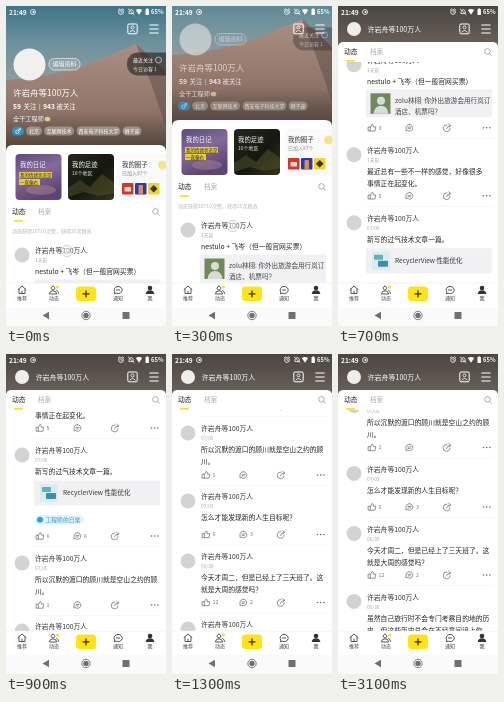
An HTML page that plays this animation: 160 by 320 pixels, repeating every 3.9 s.

```html
<!DOCTYPE html>
<html>
<head>
<meta charset="utf-8">
<style>
html, body { margin: 0; width: 100%; height: 100%; overflow: hidden; background: #fff; }
svg { display: block; width: 100vw; height: 100vh; }
text { font-family: "Noto Sans CJK SC", "Noto Sans CJK", "Noto Sans", sans-serif; white-space: pre; }
</style>
</head>
<body>
<svg id="stage" viewBox="0 0 160 320">
  <defs>
    <linearGradient id="sky" x1="0" y1="0" x2="0" y2="1">
      <stop offset="0" stop-color="#3f7488"/><stop offset=".25" stop-color="#6c919d"/>
      <stop offset=".5" stop-color="#8d9ca1"/><stop offset=".7" stop-color="#a39a98"/>
    </linearGradient>
    <linearGradient id="dune" x1="0" y1="0" x2="0" y2="1">
      <stop offset="0" stop-color="#ab8f84"/><stop offset=".55" stop-color="#92776c"/>
      <stop offset="1" stop-color="#6b574d"/>
    </linearGradient>
    <linearGradient id="ground" x1="0" y1="0" x2="0" y2="1">
      <stop offset="0" stop-color="#55473d" stop-opacity="0"/>
      <stop offset="1" stop-color="#4b4036"/>
    </linearGradient>
    <linearGradient id="dim" gradientUnits="userSpaceOnUse" x1="0" y1="0" x2="0" y2="140">
      <stop offset="0" stop-color="#4b4541"/><stop offset=".28" stop-color="#6a6058"/>
      <stop offset="1" stop-color="#6a6663"/>
    </linearGradient>
    <linearGradient id="dusk" x1="0" y1="0" x2=".4" y2="1">
      <stop offset="0" stop-color="#5b4a80"/><stop offset=".5" stop-color="#846a98"/>
      <stop offset="1" stop-color="#5d4478"/>
    </linearGradient>
    <linearGradient id="wood" x1="0" y1="0" x2="1" y2="1">
      <stop offset="0" stop-color="#23271d"/><stop offset=".55" stop-color="#15180f"/>
      <stop offset="1" stop-color="#34331b"/>
    </linearGradient>
  </defs>
  <rect width="160" height="320" fill="#fff"/>
  <g id="photo"></g>
  <rect id="shade" width="160" height="150" fill="url(#dim)"/>
  <g id="profile"><g id="badge"></g><g id="name"></g><g id="facts"></g></g>
  <g id="sheet"></g>
  <g id="cover">
    <path d="M0 0H160V42Q160 36 154 36H6Q0 36 0 42Z" fill="url(#dim)"/>
    <g id="title"></g>
  </g>
  <g id="tabs"></g>
  <g id="touch" fill="#fff" fill-opacity=".35" stroke="#aaa" stroke-width=".6">
    <circle r="5.5"/><circle r="3"/>
  </g>
  <g id="bars"></g>
</svg>
<script>
const $ = id => document.getElementById(id);
const clamp = v => Math.max(0, Math.min(1, v));
const USER = '许岩舟等100万人';

// y is the middle of the line
const txt = (x, y, size, fill, str, more = '') =>
  `<text x="${x}" y="${y + size * .36}" font-size="${size}" fill="${fill}" ${more}>${str}</text>`;
const box = (x, y, w, h, r, fill, more = '') =>
  `<rect x="${x}" y="${y}" width="${w}" height="${h}" rx="${r}" fill="${fill}" ${more}/>`;
const dot = (x, y, r, fill, more = '') =>
  `<circle cx="${x}" cy="${y}" r="${r}" fill="${fill}" ${more}/>`;
const ring = (x, y, r, color, w = .8) => dot(x, y, r, 'none', `stroke="${color}" stroke-width="${w}"`);
const line = (d, color, w = .8, more = '') =>
  `<path d="${d}" fill="none" stroke="${color}" stroke-width="${w}" stroke-linecap="round" stroke-linejoin="round" ${more}/>`;
const at = (x, y, body) => `<g transform="translate(${x} ${y})">${body}</g>`;
const BOLD = 'font-weight="700"', MEDIUM = 'font-weight="500"', MID = 'text-anchor="middle"';

$('photo').innerHTML =
  box(0, 0, 160, 146, 0, 'url(#sky)') +
  '<path d="M0 74Q40 72 76 60Q108 48 130 38Q144 50 160 66V150H0Z" fill="url(#dune)"/>' +
  '<path d="M130 38Q144 50 160 66V122Q146 78 130 38Z" fill="#5d4d46" opacity=".5"/>' +
  box(0, 108, 160, 42, 0, 'url(#ground)');

const pill = (x, w, str) =>
  box(x, 120.5, w, 9, 4.5, '#fff', 'fill-opacity=".32"') +
  txt(x + w / 2, 125, 5, '#fff', str, MID);

$('badge').innerHTML =
  dot(23.5, 58.5, 16, '#f1f0ee') +
  box(43, 52.5, 31, 11.5, 5.5, '#fff', 'fill-opacity=".12" stroke="#fff" stroke-width=".6"') +
  txt(58.5, 58, 6, '#fff', '编辑资料', MID) +
  box(121, 46.5, 52, 23, 11, '#2a2626', 'fill-opacity=".65"') +
  txt(127, 54, 5, '#fff', '最近关注') + ring(152.5, 54, 3, '#ddd', .7) +
  txt(127, 63, 5, '#ddd', '今日访客 1');

$('name').innerHTML = txt(7, 86.5, 8.5, '#fff', USER, MEDIUM);

$('facts').innerHTML =
  txt(7, 101, 6.8, '#fff', '59', BOLD) + txt(17.5, 101, 6.4, '#fff', '关注') +
  line('M33.7 98.5V104', '#fff', .5) +
  txt(37, 101, 6.8, '#fff', '943', BOLD) + txt(50.5, 101, 6.4, '#fff', '被关注') +
  txt(7, 113, 6.2, '#fff', '全干工程师') +
  '<ellipse cx="41.5" cy="113" rx="2.8" ry="2.3" fill="#d6cf91"/>' +
  box(6, 120.5, 12, 9, 4.5, '#2d93c4') +
  ring(11.4, 125.7, 1.7, '#fff', .7) +
  line('M12.6 124.5L14.3 122.8M12.9 122.8H14.3V124.2', '#fff', .7) +
  pill(20, 16, '北京') + pill(38, 30, '互联网技术') +
  pill(70.5, 44, '西安电子科技大学') + pill(116.5, 19, '狮子座');

const cards =
  box(9.5, 148, 46, 46, 4, 'url(#dusk)') +
  '<ellipse cx="35" cy="184" rx="15" ry="5" fill="#b08a8c" opacity=".45"/>' +
  txt(14, 158.5, 6.4, '#fff', '我的日记', MEDIUM) +
  box(13, 166, 33, 6, .5, '#e8cf36') + txt(14, 169, 4.5, '#322b22', '我的情绪状态是:') +
  box(13, 173, 21, 6, .5, '#e8cf36') + txt(14, 176, 4.5, '#322b22', '一直偏右') +
  box(62, 148, 46, 46, 4, 'url(#wood)') +
  '<path d="M62 182L74 174L84 181L96 168L108 177V187L92 190L78 186L62 191Z" fill="#55522c" opacity=".5"/>' +
  txt(66, 158.5, 6.4, '#fff', '我的足迹', MEDIUM) + txt(66, 167.5, 5, '#e2e5e2', '16个地区') +
  box(113, 148, 60, 46, 4, '#fafafa') +
  txt(116, 158.5, 6.4, '#333', '我的圈子', MEDIUM) + txt(116, 167.5, 5, '#888', '已加入87个') +
  dot(156.5, 159, 4.5, '#f3e58a') +
  box(116, 177, 11.5, 11.5, 1, '#d8352a') + box(118.5, 181, 6.5, 4.5, .5, '#f1dcd4') +
  box(129, 177, 11.5, 11.5, 1, '#2a3bb0') + box(132.5, 179, 4.5, 9.5, 1, '#d98d5a') +
  box(142, 177, 11.5, 11.5, 1, '#f0d62c') +
  '<path d="M147.7 179L151.5 182.8L147.7 186.6L143.9 182.8Z" fill="#3a3420"/>';

const actions = (y, likes, replies) => at(0, y,
  line('M30.5 -.8H32.3V3.2H30.5ZM32.3 -.6L34.2 -3.6Q35.7 -3.5 35.2 -.9H37.8L37 3.2H32.3', '#666', .7) +
  txt(40.5, 0, 5.4, '#777', likes) +
  line('M71.5 -3.3A3.3 3.3 0 1 1 69.5 2.6L68 3V.4A3.3 3.3 0 0 1 71.5 -3.3M70 -.6H73M70 .9H72.4', '#666', .7) +
  txt(78, 0, 5.4, '#777', replies) +
  line('M109 -3A3.4 3.4 0 1 0 112 .7M108.4 1Q108.8 -1.7 112.4 -2.3M110.6 -3.9L112.5 -2.3L111.2 -.5', '#666', .7) +
  [145.5, 148.7, 151.9].map(x => dot(x, 0, .8, '#666')).join('') +
  line('M29 10.5H155', '#ededed', .5));

const post = (y, date, lines, like, likes, replies, extra = '') => at(0, y,
  dot(16, 4, 7.5, '#d4d3d1') +
  txt(29, 0, 6.8, '#333', USER) + txt(29, 9.3, 4.8, '#aaa', date) +
  lines.map((s, i) => txt(29, 21 + i * 11.6, 6.8, '#222', s)).join('') +
  extra + actions(like, likes, replies));

const quote =
  box(28, 28.5, 126, 28, 1, '#f1f1f3') +
  box(32.5, 32.5, 20, 20.5, 0, '#70885c') + dot(43, 40, 4, '#d9dcd4') +
  '<path d="M35.5 53Q36.5 45 43 45T50.5 53Z" fill="#d9dcd4"/>' +
  txt(57, 39.5, 6.6, '#444', 'zolu林栩: 你外出旅游会用行岚订') +
  txt(57, 51, 6.6, '#444', '酒店、机票吗？');

const article =
  box(28, 29.5, 126, 25, 1, '#f1f1f3') +
  box(34, 33, 18, 18, 1, '#dcebed') + box(36, 36, 9, 5, 1, '#57b5c4') +
  box(40, 42, 10, 6, 1, '#3b8fa8') +
  txt(57, 42, 6.5, '#333', 'RecyclerView 性能优化') +
  box(29, 64, 49, 9.5, 4.7, '#e3f3fb') + dot(34, 68.8, 3, '#2ba4dc') +
  txt(39.5, 68.8, 5.8, '#2b96cc', '工程师的日常');

$('sheet').innerHTML =
  '<path d="M0 146Q0 139 7 139H153Q160 139 160 146V900H0Z" fill="#fff"/>' + cards +
  txt(6, 225, 5, '#b5b5b5', '动态获得10710次赞，获得25次精选') +
  post(245, '1天前', ['nestulo + 飞岑（但一般官网买票）'], 67, '3', '', quote) +
  post(335, '1天前', ['最近总有一些不一样的感觉，好像很多', '事情正在起变化。'], 45, '5', '') +
  post(403, '07/06', ['新写的过气技术文章一篇。'], 85, '6', '6', article) +
  post(511, '07/05', ['所以沉默的渡口的顾川就是空山之约的顾', '川。'], 46, '1', '') +
  post(579, '07/03', ['怎么才能发现新的人生目标呢？'], 37.5, '6', '3') +
  post(639, '06/30', ['今天才周二，但是已经上了三天班了。这', '就是大周的感觉吗？'], 45.5, '12', '2') +
  post(707, '06/30', ['虽然自己旅行时不会专门考察目的地的历', '史。但这些历史总会在不经意间追上你。'], 46, '8', '');

$('title').innerHTML = dot(16, 23, 7, '#efeeec') + txt(29.5, 23, 7, '#fff', USER);

$('tabs').innerHTML =
  '<path d="M0 -4Q0 -10 6 -10H154Q160 -10 160 -4V10H0Z" fill="#fff"/>' +
  box(8, 8, 9, 1.8, .9, '#ffe01b') +
  txt(6, 0, 6.8, '#222', '动态', MEDIUM) + txt(32, 0, 6.5, '#aaa', '档案') +
  ring(149.5, -.6, 2.8, '#999') + line('M151.6 1.5L153.4 3.3', '#999');

const item = (x, label, d) =>
  line(d, '#444', .9, `transform="translate(${x} 284)"`) + txt(x, 292.5, 5, '#444', label, MID);

$('bars').innerHTML =
  txt(3, 6.5, 6.6, '#fff', '21:49', BOLD) + ring(27, 6, 2.5, '#fff') + dot(27.5, 6, 1, '#fff') +
  ring(115, 6, 2.4, '#fff') +
  line('M115 4.7V6.2H116.2M112.3 3.8L113.5 2.7M116.5 2.7L117.7 3.8', '#fff', .7) +
  line('M123.3 7.6H127.2V5.2Q125.2 1.6 123.3 5.2ZM122.3 3L128 8.6', '#fff', .8) +
  '<path d="M129.8 4Q133 1.8 136.2 4L133 8.8Z" fill="#fff"/>' +
  box(139.5, 3, 3.4, 6, .6, '#fff') + box(140.5, 2.3, 1.4, 1, 0, '#fff') +
  txt(145, 6.2, 5.9, '#fff', '65%', BOLD) +
  box(121.8, 18, 9.4, 9.8, 1.2, 'none', 'stroke="#fff" stroke-width="1"') +
  ring(126.5, 21.4, 1.5, '#fff') +
  line('M123.9 26Q126.5 22.7 129.1 26', '#fff') +
  line('M143.8 19H152.2M143.8 23H152.2M143.8 27H152.2', '#fff', 1.2) +
  box(0, 277, 160, 43, 0, '#fff') + line('M0 277H160', '#e4e4e4', .5) +
  item(16, '推荐', 'M-4 -.4L0 -4L4 -.4M-3 -1V3.5H3V-1M0 1V3.4') +
  item(48, '动态', 'M-1 -3.8A1.9 1.9 0 1 1 -1.1 -3.8M-4.6 3.6Q-4.3 .8 -1 .8T2.6 3.6ZM2.6 .4Q4.4 1 4.6 3.4') +
  dot(51.5, 281, 1.5, '#ffe01b') +
  box(70, 280.5, 20, 14.5, 3.5, '#ffe411') + line('M77 287.8H83M80 284.8V290.8', '#222', 1.2) +
  item(112, '通知', 'M0 -3.6A4 3.6 0 1 1 -1.6 3.2L-3.6 3.8L-3.2 2A4 3.6 0 0 1 0 -3.6M-1.6 0H1.6') +
  dot(144, 282, 2.3, '#333') + '<path d="M139.7 288Q140 284.2 144 284.2T148.3 288Z" fill="#333"/>' +
  txt(144, 292.5, 5, '#222', '我', MID) +
  box(0, 301, 160, 19, 0, '#fafafa') +
  '<path d="M36.5 309.5L43 305.8V313.2Z" fill="#707070"/>' +
  ring(80, 309.5, 4.2, '#707070', .9) + dot(80, 309.5, 2.7, '#707070') +
  box(116.5, 306, 7, 7, .5, '#707070');

// Slow drag, then a fling that dies away: [ms, px, px per ms]
const KEYS = [[0, 0, 0], [300, 25, .146], [500, 73, .468], [900, 306, .454], [1300, 436, .196], [1700, 463.5, 0]];

function scrollAt(t) {
  const i = KEYS.findIndex(k => k[0] > t);
  if (i < 0) return KEYS[KEYS.length - 1][1];
  const [t0, a, va] = KEYS[i - 1], [t1, b, vb] = KEYS[i];
  const d = t1 - t0, u = (t - t0) / d, v = 1 - u;
  return v * v * (1 + 2 * u) * a + u * u * (3 - 2 * u) * b + d * u * v * (v * va - u * vb);
}

const move = (id, x, y) => $(id).setAttribute('transform', `translate(${x} ${y})`);
const fade = (id, o) => $(id).setAttribute('opacity', o);

function draw(ms) {
  const t = Math.floor(ms % 3900 / 100) * 100;
  const s = scrollAt(t);
  ['photo', 'profile', 'sheet'].forEach(id => move(id, 0, -s));
  move('tabs', 0, Math.max(206 - s, 46));
  move('touch', 61, 245 - s);
  fade('touch', t < 600 ? 1 : 0);
  fade('shade', clamp(s / 102) ** 3);
  // Rows nearer the top vanish sooner
  fade('badge', clamp(1 - s / 55));
  fade('name', clamp(1 - s / 73));
  fade('facts', clamp(1 - s / 125));
  fade('cover', s > 102 ? 1 : 0);
  fade('title', clamp((s - 105) / 45));
}

const start = performance.now();
function tick() {
  draw(performance.now() - start);
  requestAnimationFrame(tick);
}
tick();
</script>
</body>
</html>
```
